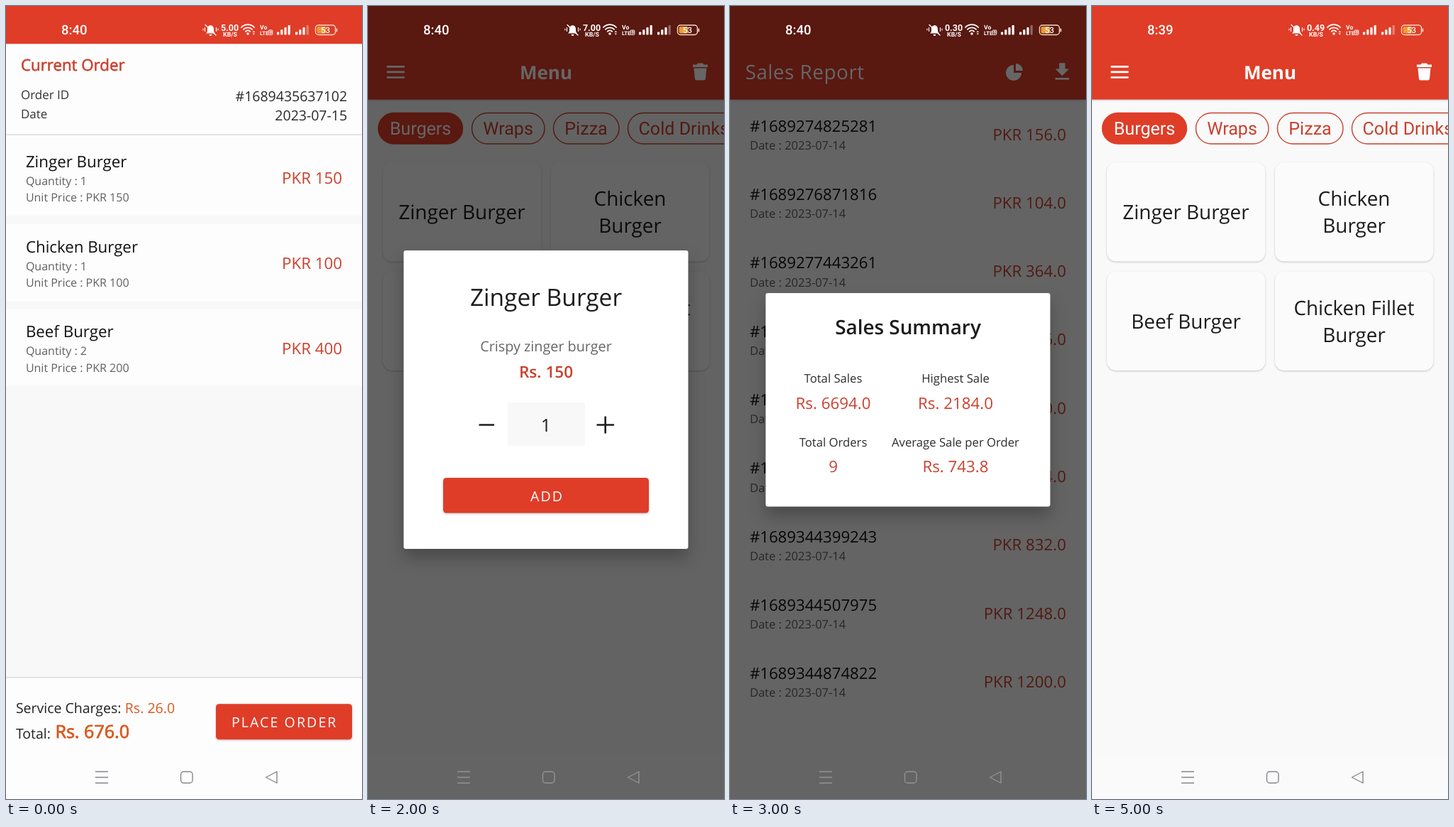
Animation of 502 by 1116 pixels, one loop 6 s. Source, as an HTML page:

```html
<!DOCTYPE html>
<html lang="en">
<head>
<meta charset="utf-8">
<title>Point of sale app screens</title>
<style>
  html, body { margin: 0; width: 100%; height: 100%; overflow: hidden; background: #f9f9f9; }
  svg { display: block; width: 502px; height: 1116px; }
  text { font-family: "Open Sans", sans-serif; text-rendering: geometricPrecision; white-space: pre; }
  .ro { font-family: Roboto, sans-serif; }
  .card { filter: drop-shadow(0 1px 1.2px rgba(0,0,0,.22)); }
  .button { filter: drop-shadow(0 1.5px 1.5px rgba(0,0,0,.25)); }
  .dialog { filter: drop-shadow(0 13px 11px rgba(0,0,0,.25)); }
</style>
</head>
<body>
<svg id="stage" viewBox="0 0 502 1116" xmlns="http://www.w3.org/2000/svg"></svg>
<script>
const W = 502, H = 1116, HOLD = 1000;
const RED = '#df3d28', PRICE = '#c9412e', INK = '#1c1c1e', GREY = '#606060', ORANGE = '#d9581c';

const rect = (x, y, w, h, fill, extra = '') =>
  `<rect x="${x}" y="${y}" width="${w}" height="${h}" fill="${fill}" ${extra}/>`;
const text = (x, y, str, size, fill = INK, extra = '') =>
  `<text x="${x}" y="${y}" font-size="${size}" fill="${fill}" ${extra}>${str.replace('&', '&amp;')}</text>`;
const path = (d, extra) => `<path d="${d}" ${extra}/>`;
const MID = 'text-anchor="middle"', END = 'text-anchor="end"';
const SEMI = 'font-weight="600"', BOLD = 'font-weight="700"', RO = 'class="ro"';
const thick = (color, w) => `stroke="${color}" stroke-width="${w}"`;
const scrim = (y = 0, h = H) => rect(0, y, W, h, '#000', 'opacity=".6"');

function bars(x, lit) {
  return [0, 1, 2, 3].map(i => {
    const h = 4 + i * 3.2;
    return rect(x + i * 5.2, 40.5 - h, 3.2, h, '#fff', `rx=".8" opacity="${i < lit ? 1 : .35}"`);
  }).join('');
}

function status(time, speed) {
  const line = 'fill="none" stroke="#fff" stroke-linecap="round"';
  const tiny = `${RO} ${BOLD}`;
  const wifi = [4.5, 8.5, 12.5].map(r => {
    const a = r * .72;
    return path(`M${341 - a} ${39 - a}A${r} ${r} 0 0 1 ${341 + a} ${39 - a}`, line + ' stroke-width="1.8"');
  }).join('');
  return text(78, 40.2, time, 18.5, '#fff', RO + ' font-weight="500"')
    + path('M282 38.5c2-2 2-3 2-6c0-7 9-7 9 0c0 3 0 4 2 6zM286.500 40h4a2 2 0 0 1-4 0z', 'fill="#fff"')
    + path('M281 26.500L296 41', line + ' stroke-width="1.4"')
    + path('M280.500 30.500v5M278 32v2M296.500 30.500v5M299 32v2', line + ' stroke-width="1.1"')
    + text(315.5, 34.7, speed, 12.5, '#fff', `${tiny} ${MID}`)
    + text(316, 42.5, 'KB/S', 8.8, '#fff', `${tiny} ${MID}`)
    + wifi + '<circle cx="341" cy="39" r="1.8" fill="#fff"/>'
    + path('M347.500 37l1.800-2 1.800 2zM347.500 38.500l1.800 2 1.800-2z', 'fill="#fff"')
    + text(358, 32.7, 'Vo', 8.6, '#fff', tiny) + text(358, 40.5, 'LTE', 7.6, '#fff', tiny)
    + rect(370.2, 34, 5.6, 6.4, 'none', 'rx="1" stroke="#fff"') + text(371.4, 39.3, 'B', 5.6, '#fff', tiny)
    + bars(382, 4) + bars(408, 3)
    + rect(436.5, 27, 28, 13.5, 'none', 'rx="4" stroke="#f6d9c6" stroke-width="1.4"')
    + rect(438.5, 29, 13, 9.5, '#ee9a35', 'rx="2"')
    + rect(465.5, 31.5, 1.8, 5, '#f6d9c6', 'rx=".9"')
    + text(450.5, 38, '53', 11.5, '#fff', `${RO} font-weight="500" ${MID}`);
}

function nav(color = '#85858a') {
  return `<g fill="none" stroke="${color}" stroke-width="1.4" stroke-linejoin="round">`
    + path('M126 1077.500h18M126 1085.500h18M126 1093.500h18', '')
    + '<rect x="246.500" y="1077.500" width="16.500" height="16" rx="4"/>'
    + path('M366.500 1085.500L382 1077.500V1093.500z', '') + '</g>';
}

const button = (x, y, w, h, tx, label) =>
  rect(x, y, w, h, RED, 'rx="4.500" class="button"')
  + text(tx, y + 32.6, label, 19.5, '#fff', 'letter-spacing="2.1"');

const header = () => rect(0, 0, W, 131.6, RED, 'class="card"');

const menuBar = () => header()
  + path('M26.500 85.300h25M26.500 92.900h25M26.500 100.500h25', 'stroke="#fff" stroke-width="2.700"')
  + path('M458 82.500h5.500l1.500-2h7l1.500 2h5.500v3.500h-21zM459.500 87.500h18l-1.500 15q-.2 2-2.200 2h-10.600q-2 0-2.200-2z', 'fill="#fff"')
  + text(251, 102.7, 'Menu', 26, '#fff', `${BOLD} ${MID}`);

function chip(x, w, label, cx, on) {
  return rect(x, 150.5, w, 43.5, on ? RED : 'none', `rx="21.750" stroke="${on ? RED : PRICE}" stroke-width="1.4"`)
    + text(cx, 180.5, label, 25.1, on ? '#fff' : PRICE, `${RO} ${MID}`);
}

function card(col, row, lines) {
  const x = 21 + col * 237, y = 220 + row * 153.5;
  const first = y + 80 - (lines.length - 1) * 19;
  return rect(x, y, 223.5, 139.5, '#fbfbfb', 'rx="13" class="card"')
    + lines.map((s, i) => text(x + 111.5, first + i * 38, s, 27.9, INK, MID)).join('');
}

const menuPage = () => rect(0, 0, W, H, '#f9f9f9')
  + chip(14.5, 119, 'Burgers', 74, true) + chip(146.5, 102.5, 'Wraps', 197.5)
  + chip(261.5, 92.5, 'Pizza', 307.5) + chip(366.5, 160, 'Cold Drinks', 445.4)
  + card(0, 0, ['Zinger Burger']) + card(1, 0, ['Chicken', 'Burger'])
  + card(0, 1, ['Beef Burger']) + card(1, 1, ['Chicken Fillet', 'Burger'])
  + rect(0, 1053, W, 63, '#fafafa') + menuBar();

const dialog = (y, h) => rect(50.3, y, 401.2, h, '#fff', 'rx="3" class="dialog"');

function orderScreen() {
  const items = [['Zinger', 1, 150], ['Chicken', 1, 100], ['Beef', 2, 200]];
  const rows = items.map(([name, n, unit], i) => {
    const y = i * 119.6;
    return (i ? rect(0, y + 187.5, W, 108, '#fdfdfd') : rect(0, 182, W, 113, '#fdfdfd'))
      + text(27.9, y + 227, name + ' Burger', 22.3, '#111')
      + text(27.9, y + 252, 'Quantity : ' + n, 16, GREY)
      + text(27.9, y + 275.3, 'Unit Price : PKR ' + unit, 16, GREY)
      + text(474, y + 250.3, 'PKR ' + n * unit, 22.3, PRICE, END);
  }).join('');
  return rect(0, 0, W, H, '#f8f8f8') + rect(0, 53, W, 128, '#fdfdfd') + rect(0, 0, W, 53.3, RED)
    + text(20.9, 91, 'Current Order', 22.3, PRICE, thick(PRICE, .6))
    + text(20.9, 130.7, 'Order ID', 17, '#333') + text(20.9, 157.7, 'Date', 17, '#333')
    + text(481.1, 133.7, '#1689435637102', 19.5, '#2a2a2a', END)
    + text(481.1, 160.7, '2023-07-15', 19.5, '#2a2a2a', END)
    + rows + rect(0, 180.5, W, 1.4, '#dedede')
    + rect(0, 945, W, 171, '#fdfdfd') + rect(0, 944.3, W, 1.4, '#dcdcdc')
    + text(13.9, 995, 'Service Charges:', 19.5, '#222') + text(167.8, 995, 'Rs. 26.0', 19.5, ORANGE)
    + text(13.9, 1030.6, 'Total:', 19.5, '#222')
    + text(69.4, 1030.3, 'Rs. 676.0', 25.1, ORANGE, thick(ORANGE, .8))
    + button(296, 982.2, 192, 50, 318, 'PLACE ORDER')
    + status('8:40', '5.00') + nav();
}

function splashScreen() {
  return '<defs><linearGradient id="glow"><stop stop-color="#fc590a"/>'
    + '<stop offset="1" stop-color="#dc3d2a"/></linearGradient></defs>'
    + rect(0, 0, W, H, 'url(#glow)') + rect(0, 0, W, 53.6, '#000')
    + rect(112, 540, 88, 88, '#fff')
    + text(204, 600, 'Zeltiro', 56.6, '#fff', BOLD)
    + text(208.5, 619, 'Point of Sale & Report', 16.4, '#fff', BOLD)
    + text(250.5, 1087, '© Tavomind', 13.9, '#fff', `opacity=".85" ${MID}`);
}

function itemScreen() {
  return menuPage() + scrim() + dialog(344, 420)
    + text(251, 421.5, 'Zinger Burger', 33.5, INK, MID)
    + text(251, 486, 'Crispy zinger burger', 19.8, '#666', MID)
    + text(251, 523.3, 'Rs. 150', 22.6, PRICE, `${SEMI} ${MID}`)
    + rect(197, 558, 109, 61, '#f8f8f8')
    + text(251, 598.5, '1', 25.1, INK, MID)
    + path('M156.500 589.500h21.500M322.500 589.500h24.500M334.700 577.500v24', 'stroke="#1c1c1e" stroke-width="2.600"')
    + button(106, 664, 290, 49.5, 229, 'ADD')
    + status('8:40', '7.00') + nav('#939396');
}

function reportScreen() {
  const orders = [
    [274825281, 156], [276871816, 104], [277443261, 364], [278120544, 156], [279306418, 450],
    [281557302, 2184], [344399243, 832], [344507975, 1248], [344874822, 1200]
  ];
  const rows = orders.map(([id, sum], i) => {
    const y = i * 96.3;
    return text(27.9, y + 176.7, '#1689' + id, 22.2, '#111')
      + text(27.9, y + 202, 'Date : 2023-07-14', 16.5, GREY)
      + text(474, y + 188.5, `PKR ${sum}.0`, 22.3, PRICE, END);
  }).join('');
  const stat = (x, y, label, value) => text(x, y, label, 16.7, '#2d2d2d', MID)
    + text(x, y + 36.5, value, 22.3, PRICE, MID);
  return rect(0, 0, W, H, '#fbfbfb') + header()
    + text(21.5, 103, 'Sales Report', 27.9, '#fff', 'letter-spacing=".5"')
    + path('M400 83A11 11 0 1 0 411 94H400zM403 81A10 10 0 0 1 413 91H403z', 'fill="#fff"')
    + path('M478.200 88.500h-5.600v-8.300h-8.400v8.300h-5.600l9.800 9.800zM458.600 101h19.600v2.800h-19.600z', 'fill="#fff"')
    + rows + scrim() + dialog(404, 300.5)
    + text(251, 462, 'Sales Summary', 27.9, INK, `${SEMI} ${MID}`)
    + stat(145.5, 530, 'Total Sales', 'Rs. 6694.0') + stat(318, 530, 'Highest Sale', 'Rs. 2184.0')
    + stat(145.5, 619.5, 'Total Orders', '9') + stat(318, 619.5, 'Average Sale per Order', 'Rs. 743.8')
    + status('8:40', '0.30') + nav('#939396');
}

function drawerScreen() {
  const links = ['Menu', 'Reports', 'Dashbaord', 'Preferences'];
  return menuPage() + scrim(131, 923.5) + rect(0, 131, 348.6, 923.5, '#fff')
    + rect(0, 1054.5, W, 61.5, '#fefefe')
    + rect(11, 149, 326.5, 55, '#fbe7e4', 'rx="5"')
    + links.map((s, i) => text(29.3, 183.5 + i * 67, s, 19.5, i ? '#111' : PRICE,
      `font-weight="${i ? 500 : 600}"`)).join('')
    + menuBar() + status('8:40', '4.00') + nav();
}

const menuScreen = () => menuPage() + status('8:39', '0.49') + nav();

const screens = [orderScreen, splashScreen, itemScreen, reportScreen, drawerScreen, menuScreen];
const stage = document.getElementById('stage');
stage.innerHTML = screens.map(draw => `<g visibility="hidden">${draw()}</g>`).join('');

const start = performance.now();
let current = -1;
function render(now) {
  const next = Math.floor(Math.max(0, now - start) / HOLD) % screens.length;
  if (next !== current) {
    current = next;
    [...stage.children].forEach((g, i) => g.setAttribute('visibility', i === next ? 'visible' : 'hidden'));
  }
  requestAnimationFrame(render);
}
render(start);
</script>
</body>
</html>
```
